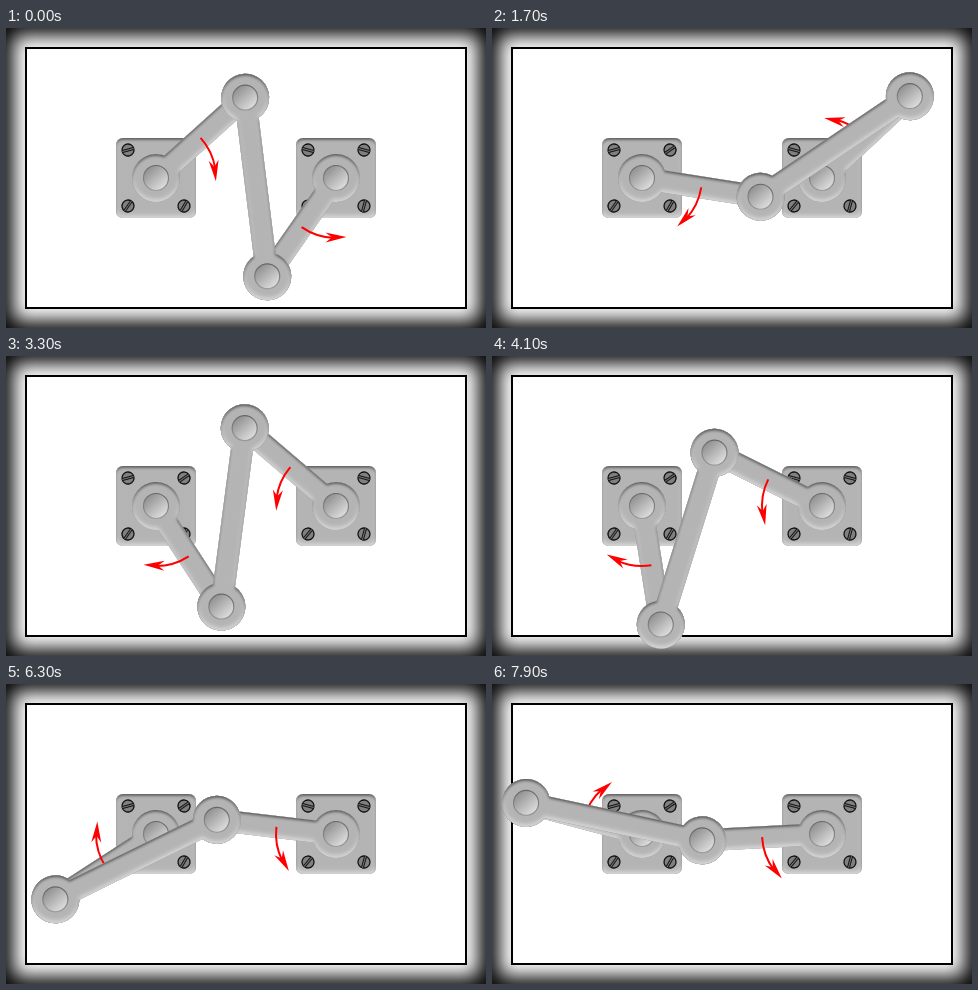
These frames come from a looping animation (480x300 px, 8 s). An HTML page with a canvas:

```html
<!DOCTYPE html>
<html lang="en">
<head>
<meta charset="utf-8">
<title>Crossed four-bar linkage</title>
<style>
  html, body { margin: 0; width: 100%; height: 100%; overflow: hidden; background: #fff; }
  #stage { position: relative; width: 480px; height: 300px; overflow: hidden; }
  #frame { position: absolute; inset: 0; box-shadow: inset 0 0 19px 7px #000; }
  #panel { position: absolute; left: 19px; top: 19px; width: 438px; height: 258px;
           border: 2px solid #000; background: #fff; }
  canvas { position: absolute; left: 0; top: 0; }
</style>
</head>
<body>
<div id="stage">
  <div id="frame"></div>
  <div id="panel"></div>
  <canvas id="view" width="480" height="300"></canvas>
</div>
<script>
const ctx = document.getElementById('view').getContext('2d');
const RAD = Math.PI / 180;
const STEP = 100, STEPS = 80;
const START = -42, TURN = 3;          // degrees, degrees per step
const CRANK = 120, COUPLER = 180;
const DISC = 24, HALF = 11, PIN = 12.5;
const LEFT = { x: 150, y: 150 }, RIGHT = { x: 330, y: 150 };
const SLOTS = [[-15, -35, -55, -60], [15, 15, -50, -75]];

// Filled shape with a bevel: dark upper edge, bright lower edge.
function bevel(shape) {
  ctx.save();
  ctx.fillStyle = '#b4b4b4';
  ctx.fill(shape);
  ctx.clip(shape);
  const outside = new Path2D();
  outside.rect(-300, -300, 1100, 900);
  outside.addPath(shape);
  const edge = (color, dy, blur) => {
    ctx.fillStyle = ctx.shadowColor = color;
    ctx.shadowOffsetY = dy;
    ctx.shadowBlur = blur;
    ctx.fill(outside, 'evenodd');
  };
  edge('rgba(30,30,30,.85)', 1.5, 3);
  edge('rgba(240,240,240,.8)', -2.5, 4);
  ctx.restore();
}

function barShape(a, b) {
  const dir = Math.atan2(b.y - a.y, b.x - a.x);
  const open = Math.asin(HALF / DISC);
  const shape = new Path2D();
  shape.arc(a.x, a.y, DISC, dir + open, dir - open + 2 * Math.PI);
  shape.arc(b.x, b.y, DISC, dir + Math.PI + open, dir + 3 * Math.PI - open);
  shape.closePath();
  return shape;
}

function pin({ x, y }) {
  const face = ctx.createLinearGradient(x - 8, y - 9, x + 8, y + 9);
  face.addColorStop(0, '#929292');
  face.addColorStop(1, '#dcdcdc');
  const rim = ctx.createLinearGradient(x, y - PIN, x, y + PIN);
  rim.addColorStop(0, '#666');
  rim.addColorStop(1, '#999');
  ctx.beginPath();
  ctx.arc(x, y, PIN, 0, 2 * Math.PI);
  ctx.fillStyle = face;
  ctx.fill();
  ctx.strokeStyle = rim;
  ctx.lineWidth = 1.2;
  ctx.stroke();
}

function bar(a, b) {
  bevel(barShape(a, b));
  pin(a);
  pin(b);
}

function screw(x, y, angle) {
  ctx.save();
  ctx.translate(x, y);
  ctx.rotate(angle * RAD);
  ctx.beginPath();
  ctx.arc(0, 0, 6, 0, 2 * Math.PI);
  ctx.fillStyle = '#808080';
  ctx.fill();
  ctx.strokeStyle = '#111';
  ctx.lineWidth = 1.3;
  ctx.stroke();
  for (const [color, width] of [['#151515', 3], ['#777', 1]]) {
    ctx.beginPath();
    ctx.moveTo(-5.8, 0);
    ctx.lineTo(5.8, 0);
    ctx.strokeStyle = color;
    ctx.lineWidth = width;
    ctx.stroke();
  }
  ctx.restore();
}

function plate({ x, y }, slots) {
  const shape = new Path2D();
  shape.roundRect(x - 40, y - 40, 80, 80, 7);
  bevel(shape);
  slots.forEach((angle, i) =>
    screw(x + (i % 2 ? 28 : -28), y + (i < 2 ? -28 : 28), angle));
}

// Arrow along a circle of radius 60, leading the crank by 45 degrees.
function arrow(pivot, from, sense) {
  const r = CRANK / 2, tip = from + sense * 45 * RAD;
  ctx.strokeStyle = ctx.fillStyle = '#f00';
  ctx.lineWidth = 2;
  ctx.beginPath();
  ctx.arc(pivot.x, pivot.y, r, from, tip - sense * 0.2, sense < 0);
  ctx.stroke();
  ctx.save();
  ctx.translate(pivot.x + r * Math.cos(tip), pivot.y + r * Math.sin(tip));
  ctx.rotate(tip + sense * (Math.PI / 2 - 0.16));
  ctx.beginPath();
  ctx.moveTo(0, 0);
  ctx.lineTo(-21, -5);
  ctx.lineTo(-14.5, 0);
  ctx.lineTo(-21, 5);
  ctx.closePath();
  ctx.fill();
  ctx.restore();
}

// Far joint of the crossed linkage: the parallelogram corner
// mirrored in the line from the near joint to the right pivot.
function farJoint(near) {
  const dx = RIGHT.x - near.x, dy = RIGHT.y - near.y;
  const k = 2 * COUPLER * dx / (dx * dx + dy * dy);
  return { x: near.x + k * dx - COUPLER, y: near.y + k * dy };
}

function draw(step) {
  const angle = (START + TURN * step) * RAD;
  const near = { x: LEFT.x + CRANK * Math.cos(angle), y: LEFT.y + CRANK * Math.sin(angle) };
  const far = farJoint(near);
  ctx.clearRect(0, 0, 480, 300);
  plate(LEFT, SLOTS[0]);
  plate(RIGHT, SLOTS[1]);
  bar(LEFT, near);
  bar(RIGHT, far);
  arrow(LEFT, angle, 1);
  arrow(RIGHT, Math.atan2(far.y - RIGHT.y, far.x - RIGHT.x), -1);
  bar(near, far);
}

const begin = performance.now();
function tick() {
  draw(Math.floor((performance.now() - begin) / STEP) % STEPS);
  requestAnimationFrame(tick);
}
tick();
</script>
</body>
</html>
```
